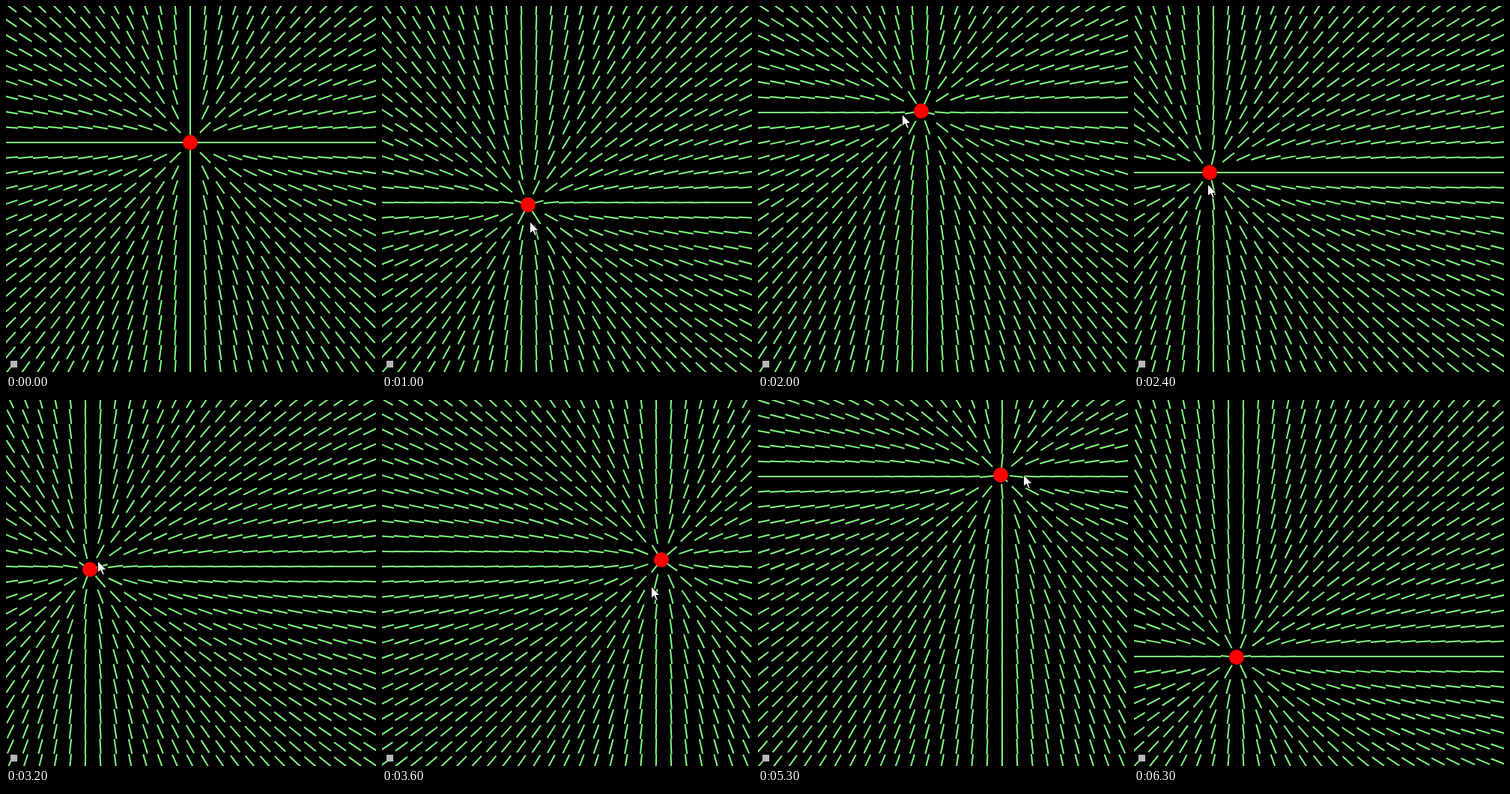
Animation, 494 px wide and 488 px high, one loop 6700 ms. Source, as an HTML page:

```html
<!DOCTYPE html>
<html lang="en">
<head>
<meta charset="utf-8">
<title>Radial line field</title>
<style>
  html, body { margin: 0; width: 100%; height: 100%; overflow: hidden; background: #000; }
  svg { display: block; width: 494px; height: 488px; }
</style>
</head>
<body>
<svg viewBox="0 0 494 488">
  <rect width="494" height="488" fill="#000"/>
  <path id="field" fill="none" stroke="#80ff80" stroke-width="2"/>
  <rect x="6" y="473" width="9" height="9" fill="#b8b8b8"/>
  <circle id="ball" r="10" fill="#f00"/>
  <path id="cursor" d="M.5 .5V16.5L4.2 13L7 19H9.6L7 12.5H12Z" fill="#fff" stroke="#000"/>
</svg>
<script>
const LOOP = 6700, STEP = 20, HALF = 10;

// time, ball x, ball y, pointer offset x, pointer offset y
const drag = [
  [800, 290, 205, -12, 14], [1000, 195, 265, 2, 22],
  [1300, 262, 322, 28, 2], [1600, 328, 246, -20, -25],
  [2000, 218, 140, -26, 4], [2400, 101, 222, -3, 15],
  [3200, 112, 226, 10, -12], [3400, 238, 126, 26, 4],
  [3600, 373, 213, -14, 35], [3800, 286, 282, -26, -8],
  [4100, 126, 154, -31, 11], [4400, 112, 286, 14, 20],
  [4700, 290, 326, 22, -12], [5000, 232, 158, 4, -22],
  [5300, 324, 100, 30, -1], [5600, 386, 222, -4, 24],
  [5900, 272, 326, -24, 6], [6300, 137, 343, 0, 0]
];

const field = document.getElementById('field');
const ball = document.getElementById('ball');
const cursor = document.getElementById('cursor');

// The picture holds still between these moments.
function heldTime(t) {
  const hundred = Math.floor(t / 100) * 100;
  if (t < 400) return 0;
  if (t < 800) return Math.min(hundred, 600);
  if (t < 3200) return Math.min(hundred, 2400);
  if (t < 4100) return Math.min(hundred, 3900);
  if (t < 6300) return Math.min(4100 + Math.floor((t - 4100) / 300) * 300, 5900);
  return 6300;
}

function spline(a, b, c, d, u) {
  return b + u / 2 * (c - a + u * (2 * a - 5 * b + 4 * c - d + u * (3 * (b - c) + d - a)));
}

function pose(t) {
  if (t < 400) return { x: 246, y: 182 };
  if (t < 800) {
    const u = (t - 400) / 200;
    return { x: 246, y: 182, px: 447 - 126 * u, py: 121 + 81 * u };
  }
  const last = drag.length - 1;
  let i = 0;
  while (i < last - 1 && t >= drag[i + 1][0]) i++;
  const at = n => drag[Math.max(0, Math.min(last, n))];
  const [a, b, c, d] = [at(i - 1), at(i), at(i + 1), at(i + 2)];
  const u = (t - b[0]) / (c[0] - b[0]);
  const value = k => spline(a[k], b[k], c[k], d[k], u);
  const x = value(1), y = value(2);
  if (t >= 6300) return { x, y };
  return { x, y, px: x + value(3), py: y + value(4) };
}

function fieldPath(x, y) {
  let d = '';
  for (let gy = 2; gy < 500; gy += STEP) {
    for (let gx = 6; gx < 500; gx += STEP) {
      const angle = Math.atan2(y - gy, x - gx);
      const dx = HALF * Math.cos(angle), dy = HALF * Math.sin(angle);
      d += `M${(gx - dx).toFixed(2)} ${(gy - dy).toFixed(2)}L${(gx + dx).toFixed(2)} ${(gy + dy).toFixed(2)}`;
    }
  }
  return d;
}

let shown = -1;
function draw(time) {
  const t = heldTime(time % LOOP);
  if (t === shown) return;
  shown = t;
  const p = pose(t);
  field.setAttribute('d', fieldPath(p.x, p.y));
  ball.setAttribute('cx', p.x);
  ball.setAttribute('cy', p.y);
  const visible = p.px !== undefined;
  cursor.setAttribute('visibility', visible ? 'visible' : 'hidden');
  if (visible) cursor.setAttribute('transform', `translate(${Math.round(p.px)} ${Math.round(p.py)})`);
}

const start = performance.now();
function tick() {
  draw(performance.now() - start);
  requestAnimationFrame(tick);
}
tick();
</script>
</body>
</html>
```
